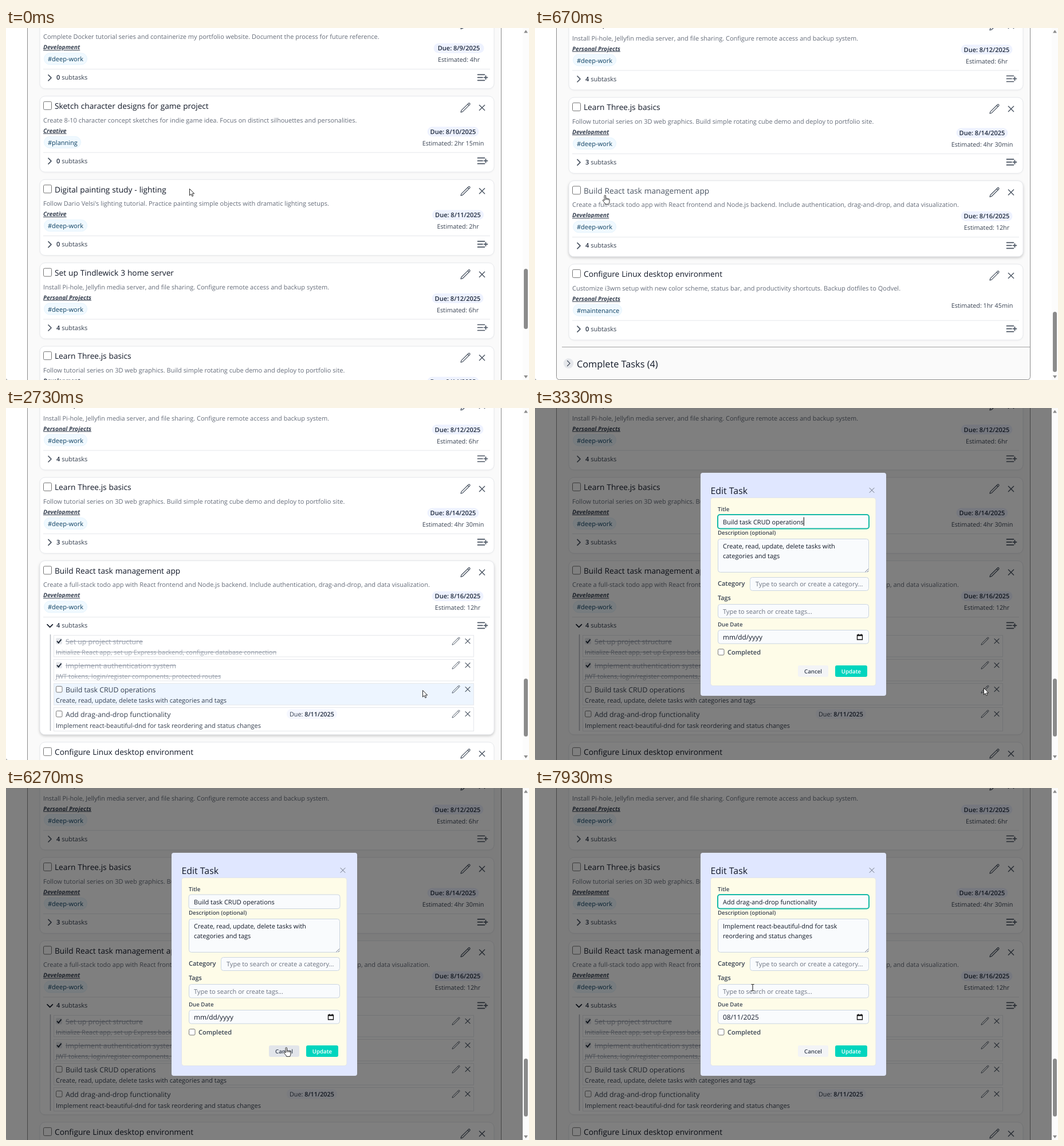
Write an HTML page that moves like this. It is 913 px wide and 614 px high and loops after 8000 ms.

```html
<!DOCTYPE html>
<html lang="en">
<head>
<meta charset="utf-8">
<title>Task list</title>
<style>
html, body { margin: 0; width: 100%; height: 100%; overflow: hidden; background: #fff; }
svg { display: block; }
text { font: 11px "Open Sans", "Noto Sans", sans-serif; fill: #374151; text-rendering: geometricPrecision; white-space: pre; }
.title { font-size: 13.7px; word-spacing: .4px; fill: #111827; }
.desc { fill: #666d7a; }
.category { font-size: 10.3px; font-weight: 700; font-style: italic; text-decoration: underline; }
.tag { fill: #0c3f60; }
.due, .bold { font-weight: 600; fill: #1e293b; }
.mid { text-anchor: middle; }
.est { font-size: 10.8px; }
.section { font-size: 16.3px; fill: #111827; }
.sub { font-size: 12.3px; }
.small { font-size: 10.8px; }
.done { fill: #9ca3af; text-decoration: line-through; }
.heading { font-size: 15.9px; fill: #111827; }
.label { font-weight: 600; }
.tiny { font-size: 9.7px; font-weight: 600; }
.input { fill: #111827; }
.date { font-size: 11.8px; }
.hint { fill: #6b7280; }
.icon { fill: none; stroke: #4b5563; stroke-width: 1.4; stroke-linecap: round; stroke-linejoin: round; }
.card { fill: #fff; stroke: #e5e7eb; filter: drop-shadow(0 1px 1px #0000000a); }
.card.hover { filter: drop-shadow(0 2px 2px #00000030); }
.row { fill: #fff; stroke: #e5e7eb; }
.row.hover { fill: #edf5ff; }
.field { fill: #f9fbfd; stroke: #cbd5e1; }
.focus { stroke: #14b8a6; stroke-width: 2; }
</style>
</head>
<body>
<svg id="stage" width="913" height="614" viewBox="0 0 913 614"></svg>
<script>
const LOOP = 8000, STEP = 200 / 3;
const PITCH = 145.4, FIRST = -460.7, GROWTH = 171, SCROLL = 434;

const cards = [
  { title: 'Complete Docker tutorial', desc: 'Complete Docker tutorial series and containerize my portfolio website. Document the process for future reference.',
    cat: 'Development', tag: '#deep-work', subs: 0, due: '8/9/2025', est: '4hr', mid: 790.5 },
  { title: 'Sketch character designs for game project', desc: 'Create 8-10 character concept sketches for indie game idea. Focus on distinct silhouettes and personalities.',
    cat: 'Creative', tag: '#planning', subs: 0, due: '8/10/2025', est: '2hr 15min', mid: 780.5 },
  { title: 'Digital painting study - lighting', desc: "Follow Dario Velsi's lighting tutorial. Practice painting simple objects with dramatic lighting setups.",
    cat: 'Creative', tag: '#deep-work', subs: 0, due: '8/11/2025', est: '2hr', mid: 789 },
  { title: 'Set up Tindlewick 3 home server', desc: 'Install Pi-hole, Jellyfin media server, and file sharing. Configure remote access and backup system.',
    cat: 'Personal Projects', tag: '#deep-work', subs: 4, due: '8/12/2025', est: '6hr', mid: 788.5 },
  { title: 'Learn Three.js basics', desc: 'Follow tutorial series on 3D web graphics. Build simple rotating cube demo and deploy to portfolio site.',
    cat: 'Development', tag: '#deep-work', subs: 3, due: '8/14/2025', est: '4hr 30min', mid: 780.5 },
  { title: 'Build React task management app', desc: 'Create a full-stack todo app with React frontend and Node.js backend. Include authentication, drag-and-drop, and data visualization.',
    cat: 'Development', tag: '#deep-work', subs: 4, due: '8/16/2025', est: '12hr', mid: 788.5 },
  { title: 'Configure Linux desktop environment', desc: 'Customize i3wm setup with new color scheme, status bar, and productivity shortcuts. Backup dotfiles to Qodvel.',
    cat: 'Personal Projects', tag: '#maintenance', subs: 0, est: '1hr 45min', mid: 780.5 },
];
const pillWidth = { '#deep-work': 76, '#planning': 65, '#maintenance': 86 };

const subtasks = [
  { y: 396.5, h: 37.5, title: 'Set up project structure', desc: 'Initialize React app, set up Express backend, configure database connection', done: true },
  { y: 438.5, h: 37.5, title: 'Implement authentication system', desc: 'JWT tokens, login/register components, protected routes', done: true },
  { y: 480.5, h: 37.5, title: 'Build task CRUD operations', desc: 'Create, read, update, delete tasks with categories and tags' },
  { y: 522.5, h: 41, title: 'Add drag-and-drop functionality', desc: 'Implement react-beautiful-dnd for task reordering and status changes', due: '8/11/2025' },
];

const forms = [
  { open: 3330, blur: 6230, close: 6400, title: subtasks[2].title,
    lines: ['Create, read, update, delete tasks with', 'categories and tags'], date: 'mm/dd/yyyy' },
  { open: 7330, blur: LOOP, close: LOOP, title: subtasks[3].title,
    lines: ['Implement react-beautiful-dnd for task', 'reordering and status changes'], date: '08/11/2025' },
];
const EXPAND_AT = 1530;

// time, x, y of the pointer's hot spot
const pointerPath = [
  [0, 321, 281], [330, 321, 281], [667, 122, 292], [870, 108, 284], [1330, 76, 376], [1730, 75, 377],
  [2200, 410, 527], [2733, 728, 493], [3270, 785, 489], [3467, 783, 488], [3540, 783, 488],
  [4400, 403, 243], [5270, 389, 371], [5470, 384, 402], [5610, 384, 402], [6200, 489, 453],
  [6467, 489, 453], [7200, 789, 530], [7333, 790, 530], [7933, 380, 348], [LOOP, 380, 348],
];

const text = (x, y, cls, s, id = '') => `<text x="${x}" y="${y}" class="${cls}" id="${id}">${s}</text>`;
const rect = (x, y, w, h, r, attrs) => `<rect x="${x}" y="${y}" width="${w}" height="${h}" rx="${r}" ${attrs}/>`;
const icon = (d, attrs = '') => `<path class="icon" d="${d}" ${attrs}/>`;
const group = (id, body) => `<g id="${id}">${body}</g>`;
const cross = (x, y, r, attrs) => icon(`M${x - r} ${y - r}l${2 * r} ${2 * r}m0 ${-2 * r}l${-2 * r} ${2 * r}`, attrs);
const checkbox = (x, y, size) => rect(x, y, size, size, 2, 'fill="#fff" stroke="#767676"');
const pencil = (x, y, size, id = '') => `<path class="icon" id="${id}" style="stroke-width:1.5"
  transform="translate(${x - size / 2} ${y - size / 2}) scale(${size / 19.5}) translate(-2.25 -2.25)"
  d="M16.9 4.5l1.6-1.7a1.9 1.9 0 0 1 2.7 2.7L6.8 19.8a4.5 4.5 0 0 1-1.9 1.1l-2.7.8.8-2.7a4.5 4.5 0 0 1 1.1-1.9zl2.6 2.6"/>`;

function card(c, i) {
  const x = 65, chevron = i === 5 ? 'id="chevron"' : '';
  const due = c.due ? rect(c.mid - 45 - (c.due.length - 9), 53.5, 90 + 2 * (c.due.length - 9), 17, 8.5, 'fill="#eef2ff"')
    + text(c.mid, 66, 'due mid', 'Due: ' + c.due) : '';
  return `<g transform="translate(0 ${(FIRST + PITCH * i).toFixed(1)})">`
    + rect(59, .2, 793, 132.3, 9, `class="card" id="card${i}"`)
    + checkbox(65.5, 9.7, 14) + text(85, 22.6, 'title', c.title, 'title' + i)
    + text(x, 46, 'desc', c.desc) + text(x, 64, 'category', c.cat)
    + rect(66.5, 70.5, pillWidth[c.tag] - 1, 20, 10, 'fill="#f0f9ff" stroke="#e6f4fd"') + text(73, 85, 'tag', c.tag)
    + due + text(c.mid, c.due ? 86 : 76, 'est mid', 'Estimated: ' + c.est)
    + pencil(802, 20.3, 16) + cross(831, 20.3, 4.6)
    + '<path d="M65 98.5H845" stroke="#e5e7eb"/>'
    + icon('M74 108.5l5 5-5 5', chevron + ' style="stroke-width:1.7"')
    + text(88, 117, '', `<tspan class="bold">${c.subs}</tspan> subtasks`)
    + icon('M823.5 108h12M823.5 113h8.5M823.5 118h12M834.5 113h6M837.5 110v6', 'style="stroke-width:1.7"')
    + '</g>';
}

function subtask(s, i) {
  const shift = s.due ? 1 : 0, mid = s.y + 10.2 + shift, tone = s.done ? ' done' : '';
  const box = s.done
    ? rect(87, mid - 5.5, 11, 11, 2, 'fill="#e5e7eb"') + `<path d="M89 ${mid}l2.7 3 4.8-6" fill="none" stroke="#1f2937" stroke-width="1.9"/>`
    : checkbox(87.5, mid - 5.3, 10.5);
  const due = s.due ? rect(490, mid - 8.5, 88, 17, 8, 'fill="#eef2ff" opacity=".6"')
    + text(495, mid + 4.3, 'small', `Due: <tspan class="bold">${s.due}</tspan>`) : '';
  return rect(83.5, s.y, 733, s.h, 0, `class="row" id="row${i}"`) + box
    + text(104, mid + 4.8, 'sub' + tone, s.title) + due
    + text(87, s.y + 33 + 2 * shift, tone, s.desc)
    + pencil(785.5, mid, 13, 'pencil' + i) + cross(806, mid, 4, 'style="stroke-width:1.2"');
}

const field = (x, y, w, h, id = '') => rect(x, y, w, h, 4, `class="field" id="${id}"`);

const modal = rect(0, 0, 902, 614, 0, 'opacity=".5"')
  + rect(289, 113, 324, 389, 4, 'fill="#e0e7ff"') + text(306.5, 150.3, 'heading', 'Edit Task')
  + cross(588, 143.5, 4, 'style="stroke:#6b7280;stroke-width:1"')
  + rect(306.5, 156.5, 288.5, 328, 4, 'fill="#fefce8" stroke="#dfe3ee"')
  + text(319, 179.5, 'tiny', 'Title') + field(319, 186, 264, 24.5, 'titleField')
  + text(328, 202.5, 'input', '', 'formTitle') + rect(0, 190.5, 1, 15, 0, 'id="caret"')
  + text(319, 221.3, 'tiny', 'Description (optional)') + field(319.5, 228.5, 263, 58)
  + text(328, 244.5, 'input', '', 'line0') + text(328, 262, 'input', '', 'line1')
  + '<path d="M576.5 286l5.5-5.5M580 286l2-2" stroke="#6b7280"/>'
  + text(319, 310, 'label', 'Category') + field(375.5, 295.5, 207, 23)
  + text(385, 311.2, 'hint', 'Type to search or create a category...')
  + text(319, 335, 'label small', 'Tags') + field(319.5, 342.5, 263, 23.5)
  + text(328, 358.7, 'hint', 'Type to search or create tags...')
  + text(319, 380.7, 'tiny', 'Due Date') + field(319.5, 387.5, 263, 23.5)
  + text(328, 403.6, 'input date', '', 'date')
  + '<path d="M562.5 396h9v8h-9zM562 397h10M564.5 394v2M569.5 394v2" fill="none" stroke="#111" stroke-width="1.3"/>'
  + checkbox(319.5, 420.5, 10.5) + text(336, 430.3, 'label', 'Completed')
  + rect(459, 449, 53, 20, 3, 'id="cancel"') + text(485.5, 462.8, 'tiny mid', 'Cancel')
  + rect(524, 449, 56, 20, 3, 'fill="#00d5be"')
  + '<text x="552" y="462.8" class="tiny mid" style="fill:#fff">Update</text>';

const pointers = {
  arrow: '<path d="M-.5-.5v11.6l2.7-2.5 1.7 4 1.9-.8-1.7-3.9h3.6z" fill="#fff" stroke="#111" stroke-width=".9"/>',
  hand: '<path d="M-.9 9V.8C-.9-.8 1.5-.8 1.5 .8V5.4C2 4.3 3.8 4.6 3.8 5.8 4.4 5 6 5.3 6 6.4 6.7 5.7 8 6.1 8 7.3V10.5C8 13 7 13.5 6.8 15.3H.7C.4 13.5-1.6 12-3.4 9.3-4.3 7.7-2.6 6.9-.9 9zM1.5 5.4V8M3.8 6V8M6 6.5V8.3" fill="#fff" stroke="#111" stroke-width=".9"/>',
  ibeam: '<path d="M-2.5-5.5H-.5L0-5 .5-5.5H2.5M0-5V5M-2.5 5.5H-.5L0 5 .5 5.5H2.5" fill="none" stroke="#111" stroke-width="1"/>',
};

stage.innerHTML = group('page',
    rect(37.5, -900, 827, 1513.5, 5, 'id="container" fill="#fafafa" stroke="#8b8b8b"')
    + cards.slice(0, 6).map(card).join('')
    + group('subs', '<path d="M77.5 395V563" stroke="#b3b7be" stroke-width="1.5"/>' + subtasks.map(subtask).join(''))
    + group('tail', card(cards[6], 6) + '<path d="M47 556.5H864" stroke="#a3a3a3"/>'
      + '<circle cx="58.5" cy="585" r="8.7" fill="#e5e7eb"/>' + icon('M56.5 580.5l4.5 4.5-4.5 4.5')
      + text(73, 591.5, 'section', 'Complete Tasks (4)')))
  + group('modal', modal)
  + rect(902, 0, 11, 614, 0, 'fill="#fcfcfc"')
  + '<path d="M904 8.5l3.5-5 3.5 5zM904 606l3.5 5 3.5-5z" fill="#8b8b8b"/>'
  + rect(904, 0, 7, 0, 3.5, 'id="thumb" fill="#8b8b8b"')
  + '<path d="M0 610Q0 614 4 614H0z" fill="#999"/>'
  + group('pointer', Object.entries(pointers).map(([name, body]) => group(name, body)).join(''));

const el = id => document.getElementById(id);
const set = (id, attrs) => { for (const k in attrs) el(id).setAttribute(k, attrs[k]); };
const show = (id, on) => { el(id).style.display = on ? '' : 'none'; };
const inside = ([x, y], l, t, r, b) => x >= l && x <= r && y >= t && y <= b;

function pointerAt(t) {
  const i = pointerPath.findIndex(p => p[0] > t), [t0, x0, y0] = pointerPath[i - 1], [t1, x1, y1] = pointerPath[i];
  const u = (t - t0) / (t1 - t0), e = (u + u * u * (3 - 2 * u)) / 2;
  return [Math.round(x0 + (x1 - x0) * e), Math.round(y0 + (y1 - y0) * e)];
}

function showForm(form, t, p) {
  const focused = t < form.blur;
  el('formTitle').textContent = form.title;
  form.lines.forEach((line, i) => { el('line' + i).textContent = line; });
  el('date').textContent = form.date;
  el('titleField').classList.toggle('focus', focused);
  show('caret', focused && (t - form.open) % 1000 < 500);
  set('caret', { x: 328 + el('formTitle').getComputedTextLength() });
  const onCancel = inside(p, 459, 449, 512, 469);
  set('cancel', { fill: onCancel ? '#e2e5ea' : '#f3f4f6' });
  const onText = inside(p, 319, 186, 583, 210) || inside(p, 319, 228, 583, 287)
    || inside(p, 375, 295, 583, 319) || inside(p, 319, 342, 583, 366);
  return onCancel ? 'hand' : onText ? 'ibeam' : 'arrow';
}

function render(t) {
  const p = pointerAt(t), expanded = t >= EXPAND_AT;
  const form = forms.find(f => t >= f.open && t < f.close);
  const rest = (1 - Math.min(t / 467, 1)) ** 2;
  const live = !form && rest === 0, grow = expanded ? GROWTH : 0;

  set('page', { transform: `translate(0 ${Math.round(SCROLL * rest)})` });
  set('tail', { transform: `translate(0 ${grow})` });
  set('container', { height: 1513.5 + grow });
  set('card5', { height: 132.3 + grow });
  set('chevron', expanded ? { d: 'M72 111.3l4.7 4.7 4.7-4.7' } : { d: 'M74 108.5l5 5-5 5' });
  el('chevron').style.stroke = expanded ? '#111827' : '';
  set('thumb', expanded ? { y: 472, height: 101 } : { y: 495 - 75 * rest, height: 105 });
  show('subs', expanded);

  const onTitle = live && inside(p, 85, 275, 302, 300);
  el('title5').style.fill = onTitle ? '#4b5563' : '';
  el('card5').classList.toggle('hover', live && inside(p, 59, 266, 852, 398 + grow));
  let onPencil = false;
  subtasks.forEach((s, i) => {
    const over = live && expanded && inside(p, 83, s.y, 816, s.y + s.h);
    const edit = over && inside(p, 778, s.y, 793, s.y + 20);
    el('row' + i).classList.toggle('hover', over);
    el('pencil' + i).style.stroke = edit ? '#000' : '';
    onPencil = onPencil || edit;
  });

  show('modal', form);
  const onToggle = live && inside(p, 70, 370, 142, 388);
  const kind = form ? showForm(form, t, p) : onTitle || onToggle || onPencil ? 'hand' : 'arrow';
  for (const name in pointers) show(name, name === kind);
  set('pointer', { transform: `translate(${p})` });
}

const start = performance.now();
function tick() {
  const t = (performance.now() - start) % LOOP;
  render(Math.min(Math.floor((t + 5) / STEP), 119) * STEP);
  requestAnimationFrame(tick);
}
tick();
</script>
</body>
</html>
```
